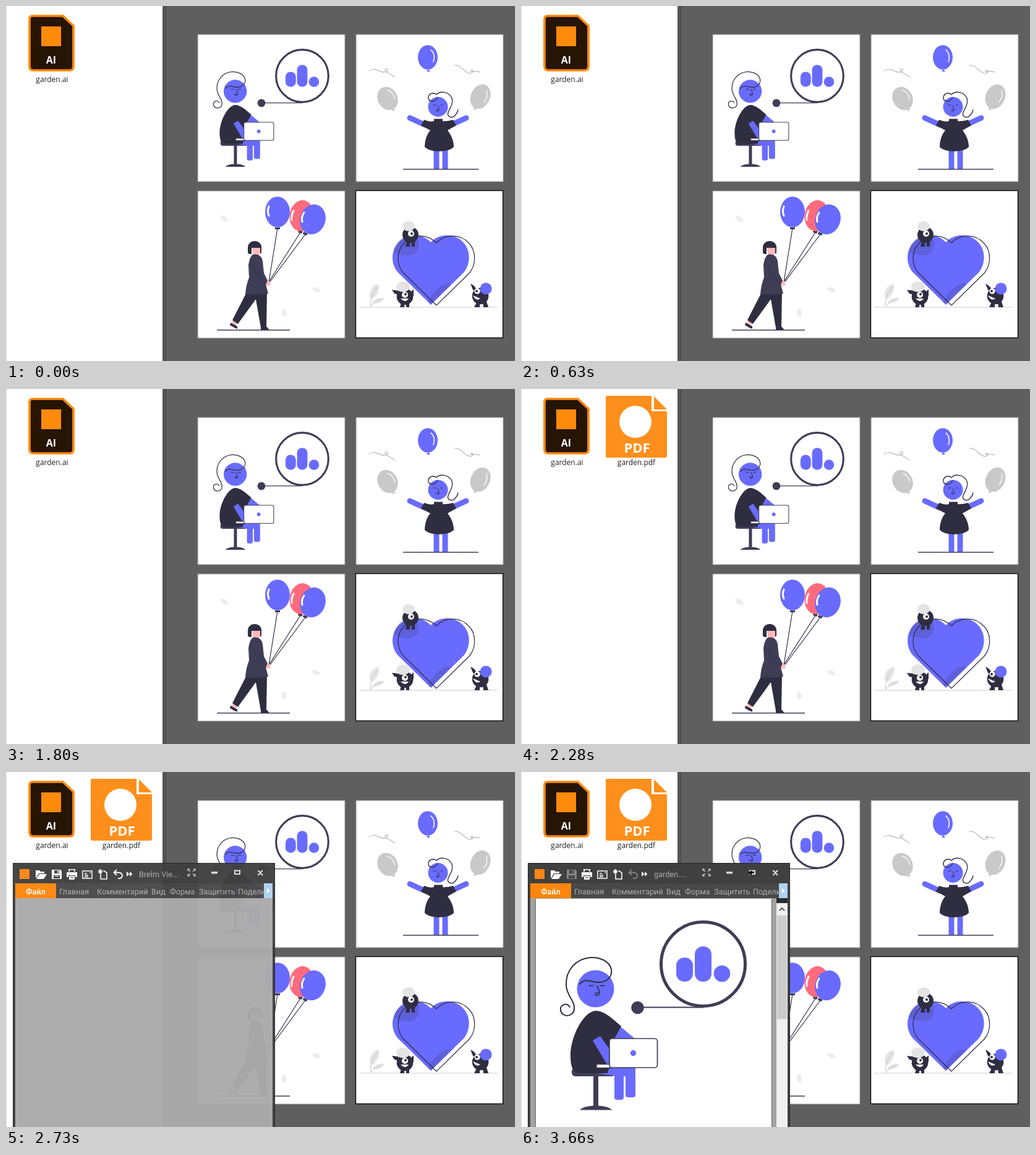
Write an HTML page that moves like this. It is 823 px wide and 574 px high and loops after 3.69 s.

```html
<!DOCTYPE html>
<html lang="ru">
<head>
<meta charset="utf-8">
<title>Desktop</title>
<style>
html, body { margin: 0; width: 823px; height: 574px; overflow: hidden; background: #fff; }
svg { display: block; }
.p { fill: #696bff; }
.d { fill: #2f2e41; }
.m { fill: #3f3d56; }
.w { fill: #fff; }
.g { fill: #c9c9c9; }
.l { fill: #e4e4e4; }
.ln { fill: none; stroke: #2f2e41; stroke-width: 1.2; stroke-linecap: round; }
.hi { fill: none; stroke: #fff; stroke-linecap: round; }
.file { font: 12px "Open Sans", "Noto Sans", sans-serif; fill: #222; text-anchor: middle; }
.tag { font-family: "Open Sans", "Noto Sans", sans-serif; font-weight: 700; fill: #fff; text-anchor: middle; }
.menu { font: 12.7px Roboto, "Noto Sans", sans-serif; fill: #adadad; }
.ic { fill: none; stroke: #fff; stroke-width: 1.8; }
</style>
</head>
<body>
<svg width="823" height="574" viewBox="0 0 823 574">
<defs>
  <g id="analyst">
    <circle cx="294.5" cy="310.5" r="68" fill="none" stroke="#3f3d56" stroke-width="5"/>
    <g class="p">
      <rect x="251" y="300" width="27" height="39" rx="13"/>
      <rect x="281" y="282" width="27" height="57" rx="13"/>
      <circle cx="325" cy="326" r="13.3"/>
    </g>
    <path d="M188 380.5H295" stroke="#3f3d56" stroke-width="1.8"/>
    <circle class="m" cx="188.5" cy="381" r="10.3"/>
    <rect class="m" x="82" y="478" width="71" height="14" rx="6"/>
    <rect class="m" x="117" y="490" width="8" height="52"/>
    <path class="m" d="M95 546.5C102 537 140 537 147 546.5Z"/>
    <path class="p" d="M119 486Q138 486 148 477H185V522Q185 526 181 526H173Q169 526 169 522V492H166V526Q166 530 162 530H155Q151 530 151 526V491Q136 490 119 486Z"/>
    <circle class="p" cx="120.5" cy="350.5" r="30"/>
    <path class="ln" stroke-width="2" style="stroke-width:2" d="M95 343C104 332 113 340 126 340C140 340 148 330 146 319C143 306 128 299 112 300C89 302 72 320 73 345C74 363 88 370 86 384C84 397 66 397 64 385C63 376 74 372 79 380"/>
    <path class="ln" style="stroke-width:1.7" d="M110 345.5H117M128 345.5H135M123 346C124 351 128 353 126 357Q123 358 120 357M119 360Q125 363 127 358"/>
    <path class="p" d="M160 411L184 431V436H150Z"/>
    <path class="d" d="M120 386C99 389 80 430 80 458C80 472 82 479 86 484Q90 487 97 487H140L150 434L162 411C148 399 135 386 120 386Z"/>
    <path class="p" d="M116 434L128 427L146 452V473H139Z"/>
    <g fill="#fff" stroke="#3f3d56" stroke-width="1.7">
      <rect x="122" y="472.5" width="24" height="6" rx="1"/>
      <rect x="143" y="431" width="77.500" height="47" rx="4.5"/>
    </g>
    <circle class="p" cx="181.500" cy="454.500" r="4.7"/>
  </g>
  <path id="heart" d="M687 483L634 431C622 418 622 396 634 383C648 367 672 367 687 382C701 367 726 367 740 383C752 396 751 418 740 431Z"/>
</defs>

<rect width="823" height="574" fill="#5f5f5f"/>
<rect class="w" width="253" height="574"/>
<path d="M.5 0V574" stroke="#dedede"/>
<rect x="253.500" width="5.500" height="574" fill="#555"/>
<path d="M258.500 0V574" stroke="#454545"/>
<g fill="#fff" stroke="#929292">
  <rect x="310" y="46" width="238" height="238"/>
  <rect x="566" y="46" width="238" height="238"/>
  <rect x="310" y="299" width="238" height="238"/>
  <rect x="565.500" y="298.500" width="238" height="238" stroke="#000" stroke-width="1.3"/>
</g>

<use href="#analyst" transform="translate(295.6 -80.35) scale(.6227)"/>

<!-- girl with raised arms -->
<g>
  <path class="p" d="M680 106L683 102L686 106Z"/>
  <ellipse class="p" cx="682" cy="83" rx="16" ry="19.800"/>
  <path class="hi" stroke-width="1.6" d="M687 71C692 75 694 83 691 90"/>
  <g class="g" transform="translate(617 149.500) rotate(-28)">
    <path d="M-3 22L0 17L3 22Z"/><ellipse rx="16" ry="19.500"/>
    <path class="hi" stroke-width="1.3" d="M6-12Q13-5 10 6"/>
  </g>
  <g class="g" transform="translate(767 146.500) rotate(24)">
    <path d="M-3 23L0 18L3 23Z"/><ellipse rx="15.500" ry="20.500"/>
    <path class="hi" stroke-width="1.3" d="M5-13Q12-5 9 6"/>
  </g>
  <g class="ln" style="stroke:#b9b9b9">
    <path d="M587 105C597 98 604 108 612 107C619 106 619 100 614 102C609 106 620 108 628 115"/>
    <path d="M725 96C736 94 741 109 751 109C757 108 755 102 752 104C748 109 757 103 766 107"/>
  </g>
  <path d="M653 181L677 192M744 181L720 192" stroke="#696bff" stroke-width="9" stroke-linecap="round"/>
  <rect class="p" x="691.500" y="228" width="9" height="36"/>
  <rect class="p" x="705.500" y="228" width="9" height="36"/>
  <path class="d" d="M692 182.500H706V186Q711 187 723 184L728 193L714 201C721 210 724 219 724 228Q717 235 700 235Q684 235 677 228C677 218 680 208 686 201L671 193L676 184Q686 188 692 186Z"/>
  <circle class="p" cx="698.500" cy="163" r="16"/>
  <path class="ln" style="stroke-width:1.4" d="M698 148C692 158 681 154 683 147C685 140 692 140 696 143C702 137 716 138 721 149C724 158 717 166 715 172C712 180 722 182 726 177Q730 173 731 168"/>
  <path class="ln" style="stroke-width:1" d="M691 160H695M703 160H706M698 161Q701 166 699 168H696M696 170Q700 171 701 168"/>
  <path d="M642 264H764" stroke="#3f3d56" stroke-width="1.3"/>
</g>

<!-- woman with balloons -->
<g>
  <g fill="#ededed">
    <path d="M346 339Q356 336 360 349Q349 351 346 339Z"/>
    <path d="M494 456Q504 452 509 461Q500 466 494 456Z"/>
    <path d="M449 488Q458 495 451 503Q442 498 449 488Z"/>
  </g>
  <path class="ln" d="M439 359L425 446M476 366L425 446M484 369L426 447"/>
  <path class="m" d="M435 358H443V361H435ZM473 362L480 364L478 368L472 366ZM481 365L488 368L486 371L480 369Z"/>
  <ellipse class="p" cx="439" cy="333" rx="20" ry="24.800"/>
  <ellipse cx="478" cy="339" rx="19.500" ry="25" fill="#ff6b7c" transform="rotate(9 478 339)"/>
  <ellipse class="p" cx="496" cy="345" rx="20.500" ry="24.500" transform="rotate(18 496 345)"/>
  <path class="hi" stroke-width="3" d="M425 324Q422 332 425 339M465 331Q461 339 462 346M482 334Q477 341 479 349"/>
  <path fill="#ffb8b8" d="M397 389H412V399L407 404H400ZM419 444L427 445V452L420 452ZM368 507L375 512L370 518L364 514Z"/>
  <path class="d" d="M391 399V391C391 384 396 380 402 380C409 380 414 385 413 392V399L411 401V391H397V401H393Z"/>
  <path class="d" d="M389 463H412L404 474L375 514L366 508ZM402 463H422L421 520H412Z"/>
  <path class="m" d="M399 402C408 400 414 405 415 413L417 432L423 444L420 450L424 465Q404 468 387 466Q388 451 393 439L392 419Q394 405 399 402Z"/>
  <path class="ln" style="stroke:#2f2e41;stroke-width:.8" d="M400 418Q400 433 419 448"/>
  <path class="d" d="M363 512L374 518V522Q368 520 362 516ZM412 519H422L426 524H412Z"/>
  <path d="M341 524H459" stroke="#3f3d56" stroke-width="1.3"/>
</g>

<!-- heart and small creatures -->
<g>
  <path class="l" d="M588 470Q587 453 603 449Q605 465 592 474ZM592 480Q598 470 612 472Q606 483 592 480Z"/>
  <path class="ln" style="stroke:#d0d0d0" d="M590 486Q587 470 601 454M590 485Q596 478 607 474"/>
  <path d="M571 487H795" stroke="#cfcfcf" stroke-width="1.2"/>
  <use href="#heart" class="p"/>
  <path fill="#2f2e41" opacity=".18" d="M627 397Q631 375 650 372L667 379Q670 397 656 403Q640 404 627 397ZM687 483L721 449Q702 445 682 478Z"/>
  <use href="#heart" class="ln" x="9" y="1"/>
  <g class="d">
    <circle cx="654" cy="370" r="13"/>
    <path d="M648 380H653V389H646ZM656 380H661V389H656Z"/>
    <path d="M624 459L634 460L636 467L628 465ZM655 462L659 458V470Z"/>
    <circle cx="645" cy="470" r="13.300"/>
    <path d="M639 480H644V487H637ZM647 480H652V487H647Z"/>
    <path d="M751 449Q761 453 761 462L755 459Z"/>
    <circle cx="767" cy="469" r="13.300"/>
    <path d="M761 479H766V487H757ZM771 478H777L780 487H772Z"/>
  </g>
  <ellipse class="l" cx="651" cy="356" rx="10" ry="8"/>
  <ellipse class="l" cx="642" cy="454" rx="11" ry="8.500"/>
  <circle class="p" cx="776" cy="457" r="9.500"/>
  <g class="w">
    <circle cx="655" cy="368" r="5"/><circle cx="645" cy="467" r="5"/><circle cx="762" cy="461" r="4.700"/>
    <path d="M638 473H651Q646 481 638 473ZM755 468L767 473Q760 478 755 468Z"/>
  </g>
  <g class="d"><circle cx="656" cy="368" r="2"/><circle cx="646" cy="466" r="2"/><circle cx="761" cy="461" r="2"/></g>
</g>

<!-- desktop files -->
<path d="M43 16H92L109 32V98Q109 104 103 104H44Q38 104 38 98V21Q38 16 43 16Z" fill="#261505" stroke="#ff8a0c" stroke-width="3.700"/>
<rect x="57" y="33" width="32" height="32" fill="#ff8a0c"/>
<text class="tag" x="73" y="93" font-size="16">AI</text>
<text class="file" x="74.500" y="123">garden.ai</text>
<g id="pdf">
  <path fill="#ff8f1c" d="M139 11H211V36H236V108Q236 111 233 111H140Q137 111 137 108V13Q137 11 139 11ZM215 12L236 33H215Z"/>
  <circle class="w" cx="185" cy="53" r="26"/>
  <text class="tag" x="187.500" y="103" font-size="22">PDF</text>
  <text class="file" x="186.500" y="123">garden.pdf</text>
</g>

<!-- viewer window -->
<g id="win">
  <rect x="11.500" y="147.500" width="423" height="440" fill="#404040" stroke="#262626"/>
  <rect x="15" y="180" width="416" height="24" fill="#484848"/>
  <rect x="15" y="204" width="416" height="380" fill="#ababab"/>
  <rect x="22" y="157" width="16" height="16" fill="#ff8614"/>
  <path class="w" d="M48 159H54L56 161H62V164H53L49 171H48ZM54 165H66L61 173H49Z"/>
  <g id="save">
    <path d="M74 158H88L90 160V173H74Z"/>
    <path d="M78 159H86V164H78ZM77 167H87V172H77Z" fill="#404040"/>
    <path d="M83 160H85V163H83ZM79 168H85V169H79Z"/>
  </g>
  <path class="w" d="M101 157H112V161H101ZM98 162H115V170H112V167H101V170H98ZM102 168H111V174H102Z"/>
  <path d="M103 158.500H110V161H103ZM104 170H109V171H104Z" fill="#404040"/>
  <path class="ic" style="stroke-width:1.500" d="M124 160H139V172H124ZM127 164H131M127 167H133M127 169.500H133M135 163H137"/>
  <path class="ic" style="stroke-width:1.600" d="M153 165V173H163V163L159 160H157M149 161H156M152.500 157V165M150 158.500L155 163.500M155 158.500L150 163.500"/>
  <path id="undo" class="ic" d="M179 158L174.500 162.500L179 167M175 162.500H181Q188 162.500 188 168Q187 173 181 172"/>
  <path class="w" d="M195 161L199.500 165L195 169ZM200 161L204.500 165L200 169Z"/>
  <text id="title" class="menu" x="215" y="170"></text>
  <path class="ic" style="stroke:#c4c4c4;stroke-width:1.300" d="M294 160V157H297M303 157H306V160M306 165V168H303M297 168H294V165M294 157L298 161M306 157L302 161M294 168L298 164M306 168L302 164"/>
  <path fill="#d8d8d8" d="M332 161H342V164.500H332Z"/>
  <path class="ic" style="stroke:#e4e4e4;stroke-width:2" d="M370 159.500H378V165H370ZM407.500 159L415 167M415 159L407.500 167"/>
  <path id="arrow" fill="#000" d="M367 163L373 159V162H377V164H373V167Z"/>
  <rect x="15" y="180" width="66" height="24" fill="#ff860d"/>
  <text class="menu" x="48" y="198" text-anchor="middle" style="fill:#fff;font-weight:500">Файл</text>
  <g class="menu">
    <text x="86" y="198">Главная</text>
    <text x="147" y="198">Комментарий</text>
    <text x="235" y="198">Вид</text>
    <text x="265" y="198">Форма</text>
    <text x="312" y="198">Защитить</text>
    <text x="375" y="198">Подели</text>
  </g>
  <rect x="417" y="180" width="14" height="24" fill="#afd2f2"/>
  <path class="w" d="M422 188L427 192L422 196Z"/>
  <g id="doc">
    <rect x="15" y="204" width="416" height="380" fill="#a2a2a2"/>
    <rect class="w" x="23" y="205" width="382" height="380"/>
    <path d="M23.500 205V574M405.500 205V574" stroke="#666"/>
    <rect x="413" y="204" width="18" height="8" fill="#2b2b2b"/>
    <rect x="413" y="212" width="18" height="372" fill="#f0f0f0"/>
    <rect x="414" y="232" width="16" height="167.500" fill="#cdcdcd"/>
    <path d="M418 224L422 220L426 224" fill="none" stroke="#505050" stroke-width="1.800"/>
    <use href="#analyst"/>
  </g>
</g>
</svg>
<script>
const LOOP = 3690, STEP = 30;
const times = { pdf: 2280, open: 2520, ready: 2760, doc: 2940, saved: 3420 };
const el = id => document.getElementById(id);
const pdf = el('pdf'), win = el('win'), doc = el('doc'), title = el('title');
const save = el('save'), undo = el('undo'), arrow = el('arrow');
const show = (node, on) => node.setAttribute('visibility', on ? 'inherit' : 'hidden');

function draw(ms) {
  const t = Math.floor((ms % LOOP) / STEP) * STEP;
  const p = Math.min(1, Math.max(0, (t - times.open) / (times.ready - times.open)));
  const loaded = t >= times.doc, saved = t >= times.saved;
  show(pdf, t >= times.pdf);
  show(win, p > 0);
  win.setAttribute('opacity', 1 - Math.pow(1 - p, 1.6));
  show(doc, loaded);
  title.textContent = loaded ? 'garden....' : 'Brelm Vie...';
  save.setAttribute('fill', saved ? '#858585' : '#fff');
  undo.style.stroke = saved ? '#858585' : '#fff';
  show(arrow, saved);
}

const start = performance.now();
function tick() {
  draw(performance.now() - start);
  requestAnimationFrame(tick);
}
draw(0);
requestAnimationFrame(tick);
</script>
</body>
</html>
```
